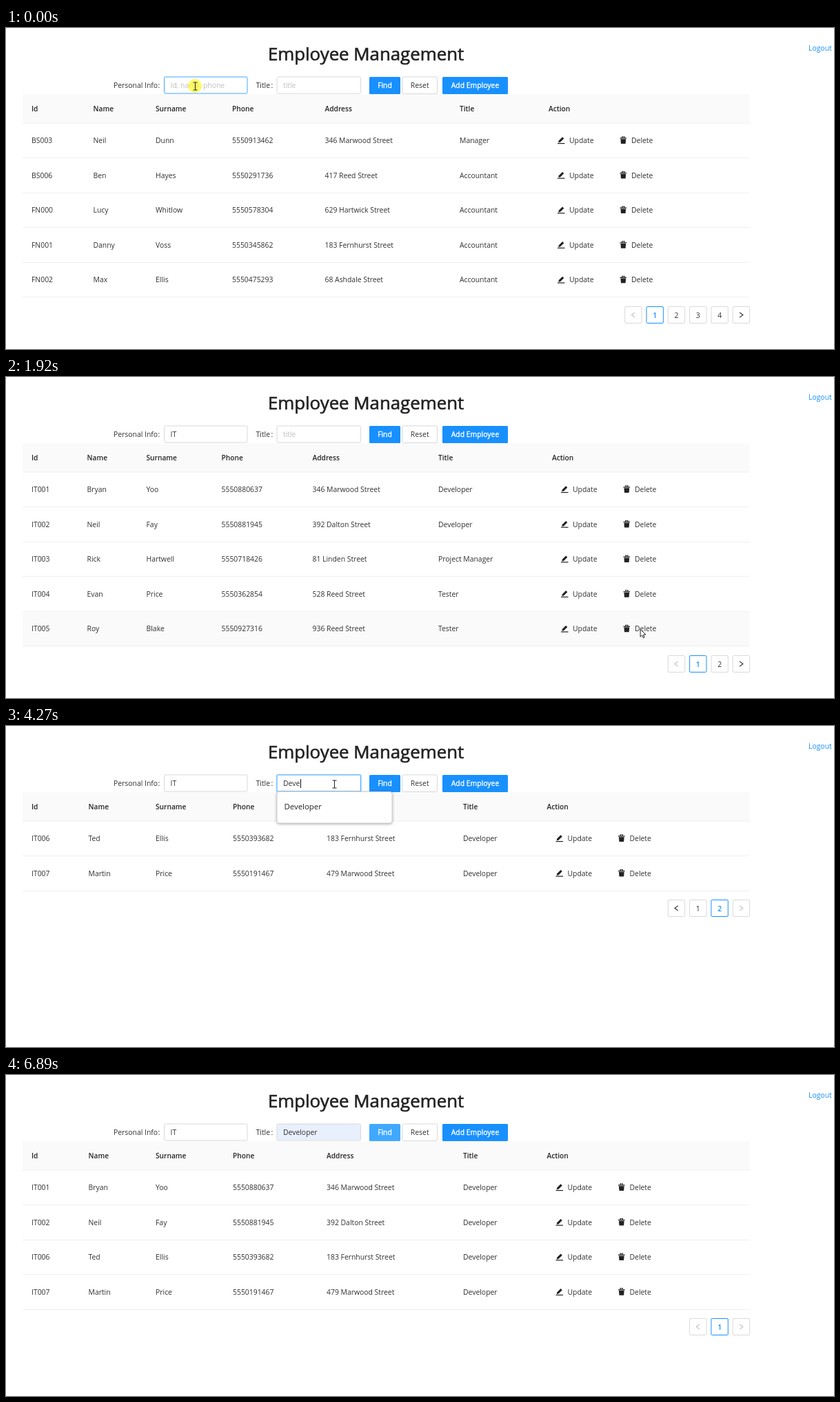
An HTML page with a canvas for the animation above (7.31 s loop, 1201x466 px).

```html
<!DOCTYPE html>
<html lang="en">
<head>
<meta charset="utf-8">
<title>Employee Management</title>
<style>
html, body { margin: 0; width: 100%; height: 100%; overflow: hidden; background: #fff; }
canvas { display: block; width: 1201px; height: 466px; }
</style>
</head>
<body>
<canvas id="stage"></canvas>
<script>
const W = 1201, H = 466, LOOP = 7310;
const BLUE = '#1890ff', LIGHT = '#40a9ff', INK = '#303030', GRAY = '#d9d9d9', PALE = '#bfbfbf';
const FACE = '"Open Sans", "Noto Sans", sans-serif';
const canvas = document.getElementById('stage');
const c = canvas.getContext('2d');
const dpr = window.devicePixelRatio || 1;
canvas.width = W * dpr;
canvas.height = H * dpr;

// ---- data ----
const HEADS = ['Id', 'Name', 'Surname', 'Phone', 'Address', 'Title', 'Action'];
const parse = s => s.trim().split('\n').map(line => line.trim().split('|'));
const staff = parse(`
  BS003|Neil|Dunn|5550913462|346 Marwood Street|Manager
  BS006|Ben|Hayes|5550291736|417 Reed Street|Accountant
  FN000|Lucy|Whitlow|5550578304|629 Hartwick Street|Accountant
  FN001|Danny|Voss|5550345862|183 Fernhurst Street|Accountant
  FN002|Max|Ellis|5550475293|68 Ashdale Street|Accountant`);
const itOne = parse(`
  IT001|Bryan|Yoo|5550880637|346 Marwood Street|Developer
  IT002|Neil|Fay|5550881945|392 Dalton Street|Developer
  IT003|Rick|Hartwell|5550718426|81 Linden Street|Project Manager
  IT004|Evan|Price|5550362854|528 Reed Street|Tester
  IT005|Roy|Blake|5550927316|936 Reed Street|Tester`);
const itTwo = parse(`
  IT006|Ted|Ellis|5550393682|183 Fernhurst Street|Developer
  IT007|Martin|Price|5550191467|479 Marwood Street|Developer`);

const wide = [37, 119.5, 217, 329, 465, 663, 784.5];
const views = [
  { from: 0, rows: staff, cols: [37, 126.5, 217, 328, 462.5, 658, 787], pages: 4, page: 1 },
  { from: 785, rows: itOne, cols: [37, 117.5, 203.5, 312.5, 444.5, 627, 792], pages: 2, page: 1 },
  { from: 2767, rows: itTwo, cols: wide, pages: 2, page: 2 },
  { from: 5740, rows: itOne.slice(0, 2).concat(itTwo), cols: wide, pages: 1, page: 1 }
];

// ---- timeline ----
const pick = (list, t) => list.filter(e => t >= (e.from ?? e[0])).pop();
const infoText = [[0, ''], [60, 'I'], [120, 'IT']];
const titleText = [[0, ''], [3800, 'D'], [3940, 'De'], [4100, 'Dev'], [4270, 'Deve'], [4580, 'Developer']];
const path = [
  [0, 274, 84], [1320, 274, 84], [1395, 279, 58], [1460, 281, 36], [1550, 281, 36],
  [2000, 972, 393], [2080, 1000, 404], [2380, 1041, 421], [2690, 1041, 421],
  [3150, 476, 84], [5205, 476, 84], [5210, 488, 84], [5270, 488, 84], [5500, 546, 85],
  [5960, 546, 85], [6500, 960, 352], [7310, 960, 352]
];
const spans = [[1320, 2000, 10], [2080, 2380, 5], [2610, 3320, 10], [5210, 5890, 10], [5970, 6580, 9]];
const clicks = [[0, 60, 274, 84], [2610, 2690, 1041, 421], [3320, 3470, 476, 84], [5590, 5740, 546, 85]];

function sampled(t) {
  for (const [a, b, n] of spans) {
    if (t >= a && t < b) {
      const step = (b - a) / (n - 1);
      return a + Math.floor((t - a) / step + 0.08) * step;
    }
  }
  return t;
}

function pointer(t) {
  if (t >= 6890 || (t >= 6575 && t < 6740)) return null;
  if (t >= 6740) return t < 6815 ? [911, 436] : [816, 416];
  t = sampled(t);
  const i = Math.max(1, path.findIndex(k => k[0] > t));
  const [t0, x0, y0] = path[i - 1], [t1, x1, y1] = path[i];
  let p = (t - t0) / (t1 - t0);
  p = p * p * (3 - 2 * p);
  return [x0 + (x1 - x0) * p, y0 + (y1 - y0) * p];
}

// ---- drawing helpers ----
const clamp = v => Math.max(0, Math.min(1, v));
const inside = (m, x, y, w, h) => !!m && m[0] >= x && m[0] <= x + w && m[1] >= y && m[1] <= y + h;

function text(s, x, y, { size = 10.4, weight = 400, color = INK, align = 'left', fat = 0 } = {}) {
  c.font = `${weight} ${size}px ${FACE}`;
  c.textAlign = align;
  c.fillStyle = color;
  c.fillText(s, x, y);
  if (fat) {
    c.strokeStyle = color;
    c.lineWidth = fat;
    c.strokeText(s, x, y);
  }
}

function box(x, y, w, h, fill, stroke, r = 1.5) {
  c.beginPath();
  c.roundRect(x, y, w, h, r);
  if (fill) { c.fillStyle = fill; c.fill(); }
  if (stroke) { c.strokeStyle = stroke; c.lineWidth = 1; c.stroke(); }
}

function shape(points, fill, stroke) {
  c.beginPath();
  points.forEach(([x, y]) => c.lineTo(x, y));
  c.closePath();
  if (fill) { c.fillStyle = fill; c.fill(); }
  if (stroke) { c.strokeStyle = stroke; c.lineWidth = 1; c.stroke(); }
}

function at(x, y, draw) {
  c.save();
  c.translate(x, y);
  draw();
  c.restore();
}

function pencil() {
  shape([[1.2, 8.2], [1.8, 5.6], [7.1, 0.3], [9.3, 2.5], [4, 7.8]], '#222');
  c.fillRect(0, 9, 10.5, 1.2);
}

function trash() {
  c.fillStyle = '#222';
  c.fillRect(0, 1.8, 9.6, 1.3);
  c.fillRect(2.6, 0, 4.4, 1);
  c.fillRect(2.6, 0, 1, 2);
  c.fillRect(6, 0, 1, 2);
  shape([[0.9, 3.7], [8.7, 3.7], [8.1, 10.4], [1.5, 10.4]], '#222');
}

function chevron(x, y, dir, color) {
  c.beginPath();
  c.moveTo(x - 2.3 * dir, y - 3.6);
  c.lineTo(x + 2.5 * dir, y);
  c.lineTo(x - 2.3 * dir, y + 3.6);
  c.strokeStyle = color;
  c.lineWidth = 1.1;
  c.stroke();
}

// ---- parts ----
function input(x, w, value, hint, { focus, hover, filled, caret }) {
  if (focus) box(x - 1.5, 69.5, w + 3, 27, 'rgba(24,144,255,.22)', null, 3);
  box(x, 71, w, 24, filled ? '#e8f0fe' : '#fff', focus || hover ? LIGHT : GRAY);
  text(value || hint, x + 9, 87, { color: value ? INK : PALE });
  if (caret) {
    const end = x + 9.5 + (value ? c.measureText(value).width : 0);
    c.fillStyle = '#111';
    c.fillRect(Math.round(end), 77, 1, 13);
  }
}

function popup(x, items, lit) {
  const h = 15 + items.length * 31;
  c.save();
  c.shadowColor = 'rgba(0,0,0,.38)';
  c.shadowBlur = 4;
  c.shadowOffsetY = 1;
  box(x, 95.5, 167, h - 0.5, '#fff', null, 3);
  c.restore();
  box(x, 95.5, 167, h - 0.5, null, '#d0d0d0', 3);
  if (lit) {
    c.fillStyle = '#eee';
    c.fillRect(x + 0.5, 101, 166, 31);
  }
  items.forEach((s, i) => text(s, x + 10.5, 121 + i * 31, { size: 11.4, color: '#222' }));
}

function findButton(t, mouse) {
  let glow = t >= 750 && t < 1150 ? 1 - clamp((t - 990) / 160) : 0;
  if (t >= 5590 || inside(mouse, 527, 71, 45, 25)) glow = 1;
  for (const start of [750, 5590]) {
    const p = (t - start) / 300;
    if (p > 0 && p < 1) {
      const d = 4 * p;
      box(527 - d, 71 - d, 45 + 2 * d, 25 + 2 * d, `rgba(24,144,255,${0.25 * (1 - p)})`, null, 2 + d);
    }
  }
  box(527, 71, 45, 25, `rgb(${24 + 40 * glow},${144 + 25 * glow},255)`);
  text('Find', 549.5, 87, { color: '#fff', align: 'center', fat: 0.35 });
}

function header(t, mouse) {
  text('Employee Management', 522, 47, { size: 25.8, color: '#222', align: 'center', fat: 0.65 });
  text('Logout', 1164, 33, { color: BLUE });
  text('Personal Info', 156, 87);
  text(':', 220.5, 87);
  text('Title', 362.5, 87);
  text(':', 384.5, 87);
  const infoFocus = t >= 60 && t < 1600;
  input(229.5, 120.5, pick(infoText, t)[1], 'Id, name, phone', {
    focus: infoFocus, hover: inside(mouse, 229, 71, 121, 25),
    caret: infoFocus && (t < 600 || t >= 1100)
  });
  const titleFocus = t >= 3400 && t < 5590;
  input(393, 121.5, pick(titleText, t)[1], 'title', {
    focus: titleFocus, hover: inside(mouse, 393, 71, 121, 25),
    filled: t >= 4580, caret: titleFocus
  });
  findButton(t, mouse);
  box(575, 71, 50.5, 24.5, '#fff', GRAY);
  text('Reset', 600.2, 87, { align: 'center' });
  box(633, 71, 95, 25, BLUE);
  text('Add Employee', 680.5, 87, { color: '#fff', align: 'center', fat: 0.35 });
}

function table({ rows, cols }, mouse) {
  c.fillStyle = '#fafafa';
  c.fillRect(24, 96, 1055, 42);
  c.fillStyle = '#f0f0f0';
  c.fillRect(24, 137.5, 1055, 1);
  HEADS.forEach((s, i) => text(s, cols[i], 121, { size: 10.2, weight: 600, color: '#262626' }));
  const ax = cols[6];
  rows.forEach((row, i) => {
    const top = 138 + i * 50.6, y = top + 29;
    if (inside(mouse, 24, top, 1055, 50.5)) {
      c.fillStyle = '#fafafa';
      c.fillRect(24, top + 0.5, 1055, 50);
    }
    row.forEach((s, k) => text(s, cols[k], y));
    at(ax + 13, y - 9, pencil);
    text('Update', ax + 30, y);
    at(ax + 103.5, y - 9.5, trash);
    text('Delete', ax + 120, y);
    c.fillStyle = '#f0f0f0';
    c.fillRect(24, Math.round(top + 50), 1055, 1);
  });
}

const pagerTop = view => 138 + view.rows.length * 50.6 + 13;

function pager(view, mouse) {
  const y = Math.round(pagerTop(view)) + 0.5, n = view.pages;
  for (let i = 0; i <= n + 1; i++) {
    const x = 1054.2 - (n + 1 - i) * 31.3, mid = x + 12.2;
    const on = i === view.page, arrow = i === 0 || i === n + 1;
    const hot = !arrow && inside(mouse, x, y, 25, 25);
    box(x, y, 24.4, 24, '#fff', on || hot ? BLUE : GRAY);
    if (arrow) {
      const dead = i === 0 ? view.page === 1 : view.page === n;
      chevron(mid, y + 12, i ? 1 : -1, dead ? PALE : '#222');
    } else {
      text(i, mid, y + 16, { color: on || hot ? BLUE : INK, align: 'center', weight: on ? 600 : 400 });
    }
  }
}

function arrowCursor() {
  shape([[0, 0], [0, 11], [2.6, 8.7], [4.3, 12.5], [6, 11.8], [4.4, 8], [7.8, 7.8]], '#fff', '#222');
}

function beamCursor() {
  c.strokeStyle = '#222';
  c.lineWidth = 1;
  c.beginPath();
  for (const s of [-1, 1]) {
    c.moveTo(-2.5, 5.5 * s + 0.5);
    c.lineTo(3.5, 5.5 * s + 0.5);
  }
  c.moveTo(0.5, -5);
  c.lineTo(0.5, 6);
  c.stroke();
}

function handCursor() {
  shape([[-1, 0.5], [0, -0.4], [1, 0.5], [1.2, 5], [3, 4.8], [4.7, 5.4], [6.4, 6], [8, 7.2],
    [8, 11], [6.6, 16], [0.4, 16], [-1.8, 12.4], [-4, 9.2], [-3, 8.2], [-1, 10]], '#fff', '#222');
  c.beginPath();
  for (const x of [1.4, 3.6, 5.7]) {
    c.moveTo(x, 5);
    c.lineTo(x, 8.5);
  }
  c.lineWidth = 0.8;
  c.stroke();
}

function cursor(t, mouse, view) {
  for (const [a, b, x, y] of clicks) {
    if (t < a || t >= b) continue;
    c.beginPath();
    c.arc(x, y, 10, 0, Math.PI * 2);
    c.fillStyle = 'rgba(255,250,50,.72)';
    c.fill();
  }
  if (!mouse) return;
  const field = inside(mouse, 229, 71, 121, 25) || inside(mouse, 393, 71, 121, 25);
  const left = 1054 - (view.pages + 1) * 31.3;
  const link = inside(mouse, 527, 71, 201, 25) || inside(mouse, left, pagerTop(view), 1079 - left, 25);
  at(mouse[0], mouse[1], field ? beamCursor : link ? handCursor : arrowCursor);
}

function draw(t) {
  const mouse = pointer(t), view = pick(views, t);
  c.setTransform(dpr, 0, 0, dpr, 0, 0);
  c.fillStyle = '#fff';
  c.fillRect(0, 0, W, H);
  table(view, mouse);
  pager(view, mouse);
  header(t, mouse);
  if (t >= 120 && t < 1600) popup(229, ['IT', 'IT007']);
  if (t >= 3940 && t < 4750) popup(393, ['Developer'], t >= 4580);
  cursor(t, mouse, view);
}

function tick() {
  draw(performance.now() % LOOP);
  requestAnimationFrame(tick);
}
tick();
</script>
</body>
</html>
```
